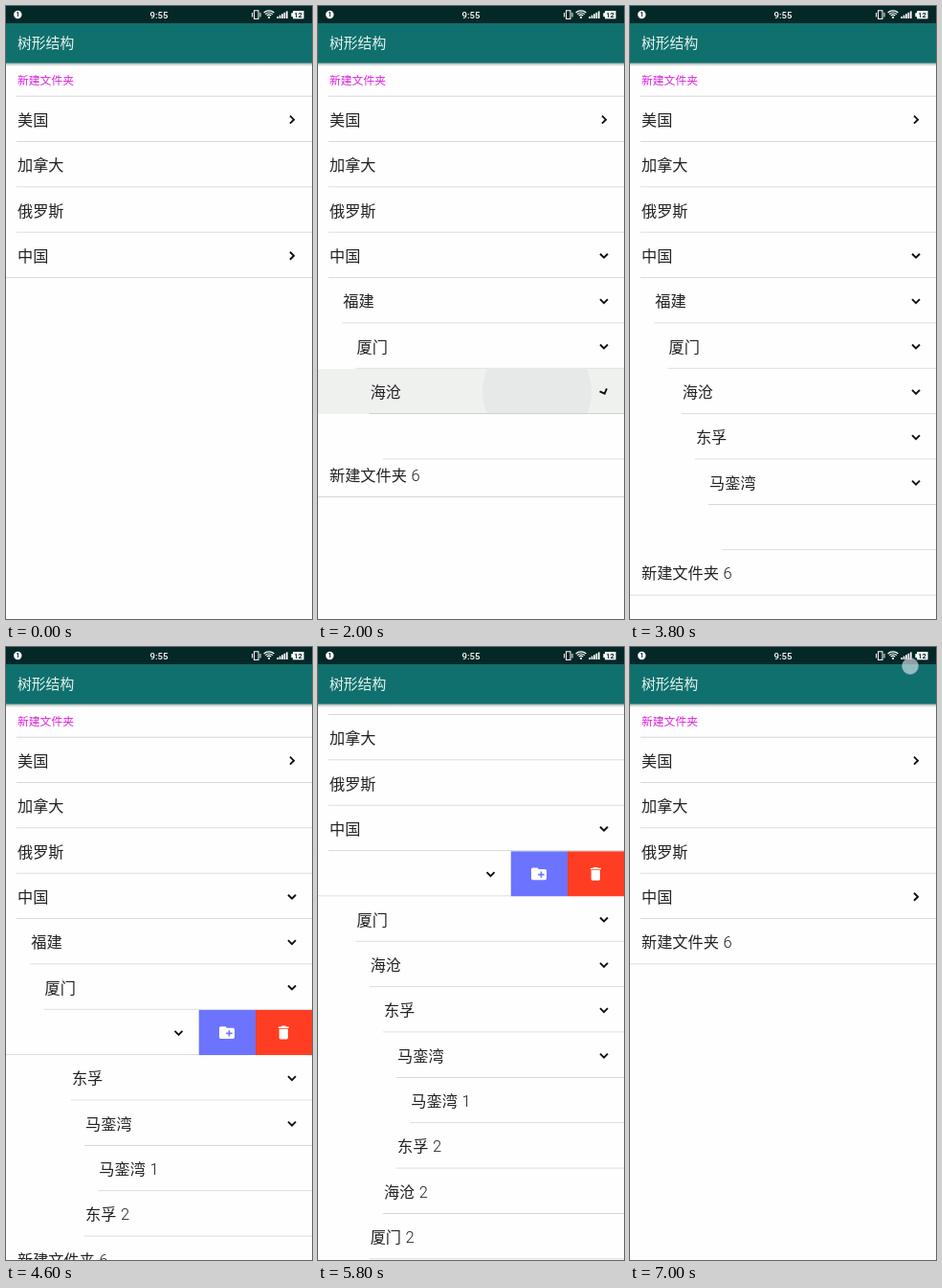
An HTML page with a canvas for the animation above (7.2 s loop, 320 by 640 pixels).

```html
<!DOCTYPE html>
<html lang="zh-CN">
<head>
<meta charset="utf-8">
<title>树形结构</title>
<style>
html, body { margin: 0; width: 100%; height: 100%; overflow: hidden; background: #fdfefd; }
canvas { display: block; }
</style>
</head>
<body>
<canvas id="stage" width="320" height="640"></canvas>
<script>
const ctx = document.getElementById('stage').getContext('2d');
const STEP = 200, STEPS = 36;
const ROW = 47.36, TOP = 94.7, INDENT = 14.22, OPEN = 118.5, COLLAPSE = 33;
const CJK = '"Noto Sans CJK SC", "Noto Sans CJK", sans-serif';

// name, depth, first step shown, step its arrow turns down
const rows = [
  ['美国', 0, 0, 99], ['加拿大', 0, 0], ['俄罗斯', 0, 0], ['中国', 0, 0, 5],
  ['福建', 1, 5, 7], ['厦门', 2, 7, 9], ['海沧', 3, 9, 10], ['东孚', 4, 10, 13],
  ['马銮湾', 5, 13, 19], ['马銮湾 1', 6, 19], ['东孚 2', 5, 22], ['海沧 2', 4, 24],
  ['厦门 2', 3, 26], ['福建 2', 2, 30], ['新建文件夹 6', 0, 2]
].map(([name, depth, born, opens]) => ({ name, depth, born, opens }));

// what the finger does at each step
const actions = {
  1: { dot: [45, 77] },
  2: { dot: [45, 77] },
  5: { press: '中国', r: 71 },
  7: { press: '福建', r: 68 },
  9: { press: '厦门', r: 71 },
  10: { press: '海沧', r: 57, turn: 68, shift: -8 },
  12: { dot: [229, 451] },
  13: { press: '东孚', r: 68 },
  15: { dot: [236, 499] },
  16: { dot: [231, 499] },
  17: { swipe: '马銮湾', dx: 60 },
  18: { swipe: '马銮湾', dx: OPEN },
  20: { swipe: '东孚', dx: 70 },
  21: { swipe: '东孚', dx: OPEN },
  23: { swipe: '海沧', dx: OPEN },
  25: { swipe: '厦门', dx: OPEN },
  27: { scroll: 30, dot: [200, 400] },
  28: { scroll: 71 },
  29: { scroll: 71, swipe: '福建', dx: OPEN },
  30: { scroll: 71 },
  31: { scroll: 30, dot: [200, 400] },
  33: { press: '中国', r: 71 },
  35: { dot: [293, 20] }
};

const folderIcon = new Path2D('M20 6h-8l-2-2H4c-1.1 0-2 .9-2 2v12c0 1.1.9 2 2 2h16c1.1 0 2-.9 2-2V8c0-1.1-.9-2-2-2zm-1 8h-3v3h-2v-3h-3v-2h3V9h2v3h3v2z');
const trashIcon = new Path2D('M6 19c0 1.1.9 2 2 2h8c1.1 0 2-.9 2-2V7H6v12zM19 4h-3.5l-1-1h-5l-1 1H5v2h14V4z');

function rect(x, y, w, h, color) {
  ctx.fillStyle = color;
  ctx.fillRect(x, y, w, h);
}

function circle(x, y, r, color) {
  ctx.fillStyle = color;
  ctx.beginPath();
  ctx.arc(x, y, r, 0, 7);
  ctx.fill();
}

function text(str, x, y, font, color, align = 'left') {
  ctx.font = font;
  ctx.fillStyle = color;
  ctx.textAlign = align;
  ctx.textBaseline = 'alphabetic';
  ctx.fillText(str, x, y);
}

function icon(path, x, y, scale) {
  ctx.save();
  ctx.translate(x, y);
  ctx.scale(scale, scale);
  ctx.translate(-12, -12);
  ctx.fillStyle = '#fff';
  ctx.fill(path);
  ctx.restore();
}

function arrow(x, y, degrees) {
  ctx.save();
  ctx.translate(x, y);
  ctx.rotate(degrees * Math.PI / 180);
  ctx.strokeStyle = '#111';
  ctx.lineWidth = 1.9;
  ctx.beginPath();
  ctx.moveTo(-2, -4);
  ctx.lineTo(2, 0);
  ctx.lineTo(-2, 4);
  ctx.stroke();
  ctx.restore();
}

function label(name, x, y) {
  const [word, number] = name.split(' ');
  text(word, x, y, '16.2px ' + CJK, '#222');
  if (number) text(number, x + word.length * 16.2 + 4.5, y, '300 16.5px Roboto, sans-serif', '#222');
}

function drawRow(row, y, n, act, last) {
  const mid = y + ROW / 2, left = 11 + INDENT * row.depth;
  const pressed = act.press === row.name;
  ctx.save();
  ctx.beginPath();
  ctx.rect(0, y, 320, ROW);
  ctx.clip();
  if (act.swipe === row.name) {
    rect(201.5, y, 59.5, ROW, '#6c74ff');
    rect(261, y, 59, ROW, '#ff3d22');
    icon(folderIcon, 231, mid, 0.8);
    icon(trashIcon, 290.3, mid, 0.77);
    ctx.translate(-act.dx, 0);
    rect(0, y, 320, ROW, '#fdfefd');
  }
  if (pressed) {
    rect(0, y, 320, ROW, '#eff1ef');
    circle(229, mid, act.r, '#e6e9e7');
  }
  if (n > row.born || !row.depth) label(row.name, left + 1, mid + 6.4);
  const hasArrow = row.opens && (row.name !== '马銮湾' || n >= row.opens);
  if (hasArrow && (n > row.born || !row.depth)) {
    const down = n >= row.opens && n < COLLAPSE;
    arrow(299, mid + 0.3, pressed && act.turn || (down ? 90 : 0));
  }
  const from = last ? 0 : left;
  rect(from, y + ROW - 1, 320 - from, 1, pressed ? '#c8cdca' : '#d3d7d8');
  ctx.restore();
}

function drawBars() {
  const shade = ctx.createLinearGradient(0, 59, 0, 63);
  shade.addColorStop(0, 'rgba(0,40,40,.4)');
  shade.addColorStop(1, 'rgba(0,40,40,0)');
  rect(0, 59, 320, 4, shade);
  rect(0, 18, 320, 41.5, '#10706d');
  rect(0, 0, 320, 18, '#042827');
  text('树形结构', 12, 44.3, '14.8px ' + CJK, '#e4f3f1');

  circle(12.3, 9, 4.2, '#fff');
  text('1', 12.3, 11.4, 'bold 6.5px Roboto, sans-serif', '#042827', 'center');
  text('9:55', 160, 12.6, '500 9.6px Roboto, sans-serif', '#fff', 'center');

  ctx.strokeStyle = '#fff';
  ctx.lineWidth = 1;
  ctx.strokeRect(259.5, 4.8, 4.5, 8.6);
  rect(257, 7, 1, 4.5, '#fff');
  rect(265.5, 7, 1, 4.5, '#fff');
  ctx.lineWidth = 1.2;
  for (const r of [3.2, 5.4, 7.6]) {
    ctx.beginPath();
    ctx.arc(275, 12.4, r, -Math.PI * 0.75, -Math.PI * 0.25);
    ctx.stroke();
  }
  circle(275, 11.9, 1.1, '#fff');
  for (let i = 0; i < 5; i++) rect(283.3 + i * 2.4, 11 - i * 1.4, 1.7, 2 + i * 1.4, '#fff');
  rect(300, 5, 11.5, 8.3, '#fff');
  rect(298.3, 7.2, 2, 4, '#fff');
  text('12', 305.6, 11.7, 'bold 7.5px Roboto, sans-serif', '#042827', 'center');
}

function draw(n) {
  const act = actions[n] || {};
  const scroll = act.scroll || 0;
  rect(0, 0, 320, 640, '#fdfefd');
  text('新建文件夹', 12, 81.8 - scroll, '11.8px ' + CJK, '#dc22dc');
  rect(11, TOP - 1 - scroll, 309, 1, '#d3d7d8');

  const shown = rows.filter(r => n >= r.born && (!r.depth || n < COLLAPSE));
  shown.forEach((row, i) => {
    const last = i === shown.length - 1;
    const y = TOP + i * ROW - scroll + (last && act.shift || 0);
    drawRow(row, y, n, act, last);
  });
  drawBars();

  if (act.dot) {
    circle(...act.dot, 8.4, 'rgba(235,240,250,.6)');
    ctx.strokeStyle = 'rgba(165,170,205,.6)';
    ctx.lineWidth = 1;
    ctx.stroke();
  }
}

function tick() {
  draw(Math.floor(performance.now() / STEP) % STEPS);
  requestAnimationFrame(tick);
}
tick();
</script>
</body>
</html>
```
